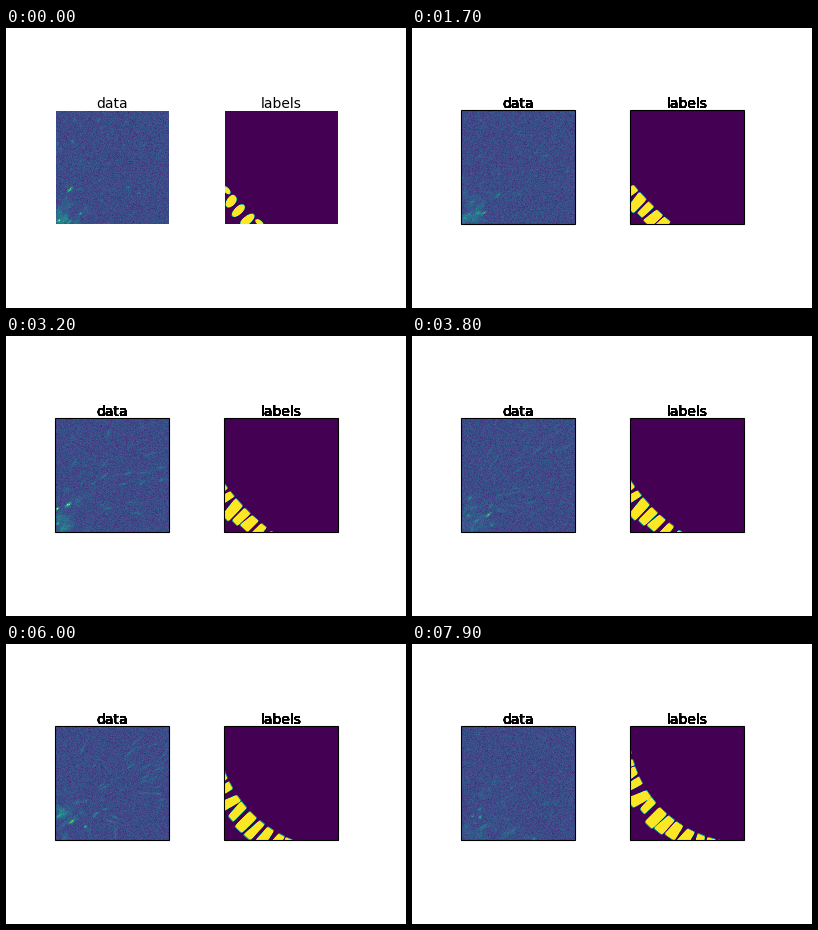
A matplotlib script that plays this animation: 400x280 px, repeating every 8000 ms.

```python
import matplotlib.pyplot as plt
import numpy as np
from matplotlib.animation import FuncAnimation
from matplotlib.patches import Rectangle

W, H, DPI = 400, 280, 100
N = 113                  # panel side in pixels
STEP, FRAMES = 100, 80
LEFTS = (50, 219)
BOTTOM = 84
SLOT = .4                # seconds between sets of bright spots
PITCH = 11.6             # cell spacing along the tissue front

X, Y = np.meshgrid(np.arange(N) + .5, np.arange(N) + .5)


def intercept(t):
    """Where the tissue front meets the left and bottom edges."""
    return 40 + .78 * t * t


def front(t):
    """Arc position and depth behind the curved tissue front."""
    h = intercept(t)
    m = 19 + 12 * (t / 7.9) ** 1.5
    c = (h * h - 2 * m * m) / (2 * h - 4 * m)
    radius = np.sqrt(2) * (c - m)
    arc = radius * (np.arctan2(c - Y, c - X) - np.pi / 4)
    return arc, np.hypot(c - X, c - Y) - radius


def labels(t):
    """Row of bar-shaped cells, round at first, then square-cut."""
    arc, depth = front(t)
    grown = 1 - np.exp(-t / .6)
    power = 2.2 + 6 * grown
    rng = np.random.default_rng(5)
    best = np.full((N, N), -4.0)
    for n in range(-6, 7):
        phase, rate, jitter = rng.uniform(0, 6.3), rng.uniform(.5, 1), rng.normal()
        tilt, taper = rng.uniform(-.15, .15), rng.uniform(-.3, .3)
        swing = np.sin(rate * t + phase)
        s = PITCH * n + 1 + .6 * jitter + swing
        w = 8.7 + 1.2 * np.cos(rate * t + 2 * phase)
        d = (19 + 3 * swing) * max(.2, 1 - (1 - grown) * (s / 27) ** 2)
        mid = depth / d - .5
        u = np.abs(arc - s - tilt * d * mid) / (w / 2 * (1 + taper * mid).clip(.3))
        r = (u ** power + np.abs(2 * mid) ** power) ** (1 / power)
        best = np.maximum(best, (1 - r) * min(w, d) / 2)
    return np.clip(best * 1.5 + .5, 0, 1)


def streak(x, y, length, angle, width):
    c, s = np.cos(angle), np.sin(angle)
    along = ((X - x) * c + (Y - y) * s) / (length + .3)
    across = ((Y - y) * c - (X - x) * s) / width
    return np.exp(-(along ** 2 + across ** 2) / 2)


def glow(slot):
    """Bright spots, faint streaks and tissue patches of one moment."""
    rng = np.random.default_rng(slot + 100)
    t = slot * SLOT
    h = intercept(t)
    fan = np.exp(-((t - 4.8) / 1.7) ** 2)     # long streaks come and go
    out = np.zeros((N, N))
    for _ in range(26):
        x, y = N - rng.uniform(0, N, 2) * (1 - .25 * fan)
        angle = np.arctan2(y - 30, x - 10) + rng.normal(0, .15)
        out += rng.uniform(.05, .16) * streak(
            x, y, 1 + 6 * fan * rng.uniform(.2, 1), angle, .7)
    for _ in range(14):
        x, y = np.abs(rng.normal(0, h / 3, 2))
        out += rng.uniform(.04, .13) * streak(
            x, y, rng.uniform(1, 5), rng.uniform(0, 1.5), rng.uniform(1, 3))
    for _ in range(4):
        x, y = np.abs(rng.normal(0, h / 2.5, 2))
        out += rng.uniform(.25, .7) * streak(x, y, rng.uniform(.6, 2), .7, .8)
    return out


GLOWS = [glow(i) for i in range(int(FRAMES * STEP / 1000 / SLOT) + 2)]


def data(i, t):
    rng = np.random.default_rng(i)
    slot, f = divmod(t / SLOT, 1)
    light = (1 - f) * GLOWS[int(slot)] + f * GLOWS[int(slot) + 1]
    return (.228 + rng.normal(0, .042, (N, N))
            + light * rng.uniform(.7, 1.3, (N, N)))


fig = plt.figure(figsize=(W / DPI, H / DPI), dpi=DPI, facecolor="white")
images, heavy = [], []
for left, title in zip(LEFTS, ("data", "labels")):
    ax = fig.add_axes([left / W, BOTTOM / H, N / W, N / H])
    ax.axis("off")
    images.append(ax.imshow(np.zeros((N, N)), cmap="viridis", vmin=0, vmax=1,
                            origin="lower", interpolation="nearest"))
    # Stacked copies darken the soft edges after the first step.
    for n in range(12):
        text = fig.text((left + N / 2) / W, 200 / H, title, fontsize=10,
                        family="DejaVu Sans", ha="center", va="baseline")
        if n:
            heavy.append(text)
    box = Rectangle((left - 1, BOTTOM), N + 1, N + 1, fill=False,
                    ec="black", lw=.8, transform=None)
    heavy.append(fig.add_artist(box))


def update(i):
    t = i * STEP / 1000
    images[0].set_data(data(i, t))
    images[1].set_data(labels(t))
    for item in heavy:
        item.set_visible(i > 0)
    return images + heavy


anim = FuncAnimation(fig, update, frames=FRAMES, interval=STEP, repeat=True,
                     repeat_delay=0, blit=False)
plt.show()
```
